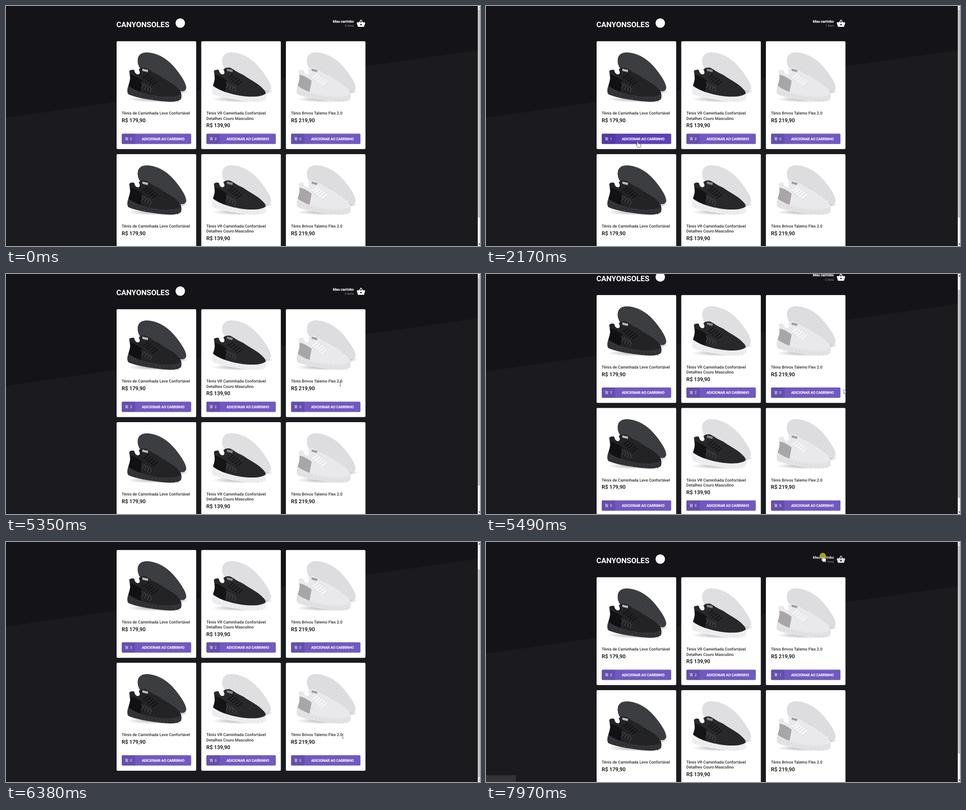
An HTML page that plays this animation: 1050 by 533 pixels, repeating every 8000 ms.

```html
<!DOCTYPE html>
<html lang="pt-BR">
<head>
<meta charset="utf-8">
<title>Loja</title>
<style>
html, body { margin: 0; width: 100%; height: 100%; overflow: hidden; background: #1b1a1f; }
svg { display: block; width: 100vw; height: 100vh; font-family: Roboto, Arial, sans-serif; text-rendering: geometricPrecision; }
.title { font-size: 8.95px; font-weight: 500; fill: #2b2b2b; }
.price { font-size: 11.75px; font-weight: 500; fill: #000; }
.label { font-size: 7.875px; fill: #fff; }
.bold { font-weight: 500; stroke: #fff; stroke-width: .28; }
.sub { font-size: 6.75px; fill: #999; }
.logo { font-size: 16.7px; font-weight: 700; fill: #fff; }
</style>
</head>
<body>
<svg id="stage" viewBox="0 0 1050 533" preserveAspectRatio="none"></svg>
<script>
const LOOP = 8000, MAX_SCROLL = 61, ROW = 250.7, COL = 187.5;

const products = [
  { lines: ['Tênis de Caminhada Leve Confortável'], price: 'R$ 179,90', width: 151,
    sole: '#434448', ridge: '#292a2d', upper: '#232326', heel: '#111113', mid: '#333438', groove: '#1f2022', lace: '#0d0d0f', strap: '#5a5b60', tag: '#b9b9bb' },
  { lines: ['Tênis VR Caminhada Confortável', 'Detalhes Couro Masculino'], price: 'R$ 139,90', width: 132,
    sole: '#e5e5e7', ridge: '#cfcfd2', upper: '#28282b', heel: '#141416', mid: '#eeeef0', groove: '#dddde0', lace: '#0f0f11', strap: '#5a5b60', tag: '#88888b' },
  { lines: ['Tênis Brivos Talemo Flex 2.0'], price: 'R$ 219,90', width: 117,
    sole: '#e2e2e4', ridge: '#d0d0d3', upper: '#e9e9ec', heel: '#aaa6a7', mid: '#e3e3e6', groove: '#cfcfd3', lace: '#fff', strap: 'none', tag: '#a19fa1', back: '#9b9a9c' }
];

// Cursor path: time, x, y
const path = [
  [200, 1012, 533], [400, 930, 330], [580, 720, 160], [760, 480, 98], [980, 296, 185],
  [1040, 294, 190], [1240, 318, 300], [1380, 340, 322], [1560, 359, 302], [2030, 359, 302],
  [2170, 336, 301], [2910, 336, 301], [3060, 346, 301], [3700, 346, 301], [3740, 350, 301],
  [3860, 430, 298], [4040, 533, 297], [4880, 533, 297], [5100, 620, 275], [5350, 740, 244],
  [5470, 790, 255], [5590, 803, 263], [5900, 800, 330], [6300, 752, 430], [6540, 735, 435],
  [6720, 735, 380], [7050, 725, 298], [7320, 725, 298], [7520, 795, 190], [7760, 772, 85], [7930, 746, 31]
];
const presses = [1740, 2580, 3100, 4220, 4700, 7190, 7950];
// Moments at which each first-row counter goes up by one
const adds = [[2030, 2710, 3280], [4380, 4860], [7350]];

const icons = {
  cart: 'M11 9h2V6h3V4h-3V1h-2v3H8v2h3v3zm-4 9c-1.1 0-1.99.9-1.99 2S5.9 22 7 22s2-.9 2-2-.9-2-2-2zm10 0c-1.1 0-1.99.9-1.99 2s.89 2 1.99 2 2-.9 2-2-.9-2-2-2zm-9.83-3.25l.03-.12.9-1.63h7.45c.75 0 1.41-.41 1.75-1.03l3.86-7.01L19.42 4h-.01l-1.1 2-2.76 5H8.53l-.13-.27L6.16 6l-.95-2-.94-2H1v2h2l3.6 7.59-1.35 2.45c-.16.28-.25.61-.25.96 0 1.1.9 2 2 2h12v-2H7.42c-.13 0-.25-.11-.25-.25z',
  basket: 'M17.21 9l-4.38-6.56c-.19-.28-.51-.42-.83-.42-.32 0-.64.14-.83.43L6.79 9H2c-.55 0-1 .45-1 1 0 .09.01.18.04.27l2.54 9.27c.23.84 1 1.46 1.92 1.46h13c.92 0 1.69-.62 1.93-1.46l2.54-9.27L23 10c0-.55-.45-1-1-1h-4.79zM9 9l3-4.4L15 9H9zm3 8c-1.1 0-2-.9-2-2s.9-2 2-2 2 .9 2 2-.9 2-2 2z'
};

const cursors = {
  arrow: '<path d="M0 0v9.2l2.1-2 1.4 3.3 1.5-.7-1.4-3.2h2.9z" fill="#fff" stroke="#000" stroke-width=".6"/>',
  hand: '<path d="M-1.2 8V1a1.2 1.2 0 0 1 2.4 0v3.6c2 .1 6 .6 6 2.6v2.3c0 1.6-1.2 2.2-1.2 3.7H0c0-1.7-3.3-4-3.5-5.4 .1-1.3 1.5-.8 2.3.2z" fill="#fff" stroke="#111" stroke-width=".7"/>',
  beam: '<path d="M-1.5-4.5h3M0-4.5v9M-1.5 4.5h3" fill="none" stroke="#444" stroke-width=".8"/>'
};

const strokes = (n, f, colour, width) =>
  `<path d="${Array.from({ length: n }, (_, i) => f(i)).join('')}" fill="none" stroke="${colour}" stroke-width="${width}" stroke-linecap="round"/>`;

function shoe(p, i) {
  const rear = 'M292 121C292 107 303 102 318 104C341 107 360 120 376 140C388 155 399 172 399 182C398 189 391 191 383 187C365 176 320 165 300 142C294 135 292 128 292 121Z';
  return `<pattern id="ridge${i}" width="6" height="4.6" patternUnits="userSpaceOnUse" patternTransform="rotate(28)">
      <path d="M0 2.3q1.5-1.6 3 0t3 0" fill="none" stroke="${p.ridge}" stroke-width="1.1"/></pattern>
    <g id="shoe${i}">
      <ellipse cx="330" cy="207" rx="62" ry="7" fill="url(#shadow)"/>
      <ellipse cx="380" cy="190" rx="24" ry="6" fill="url(#shadow)"/>
      ${p.back ? `<path d="M355 125Q368 133 373 149L362 140Z" fill="${p.back}"/>` : ''}
      <path d="${rear}" fill="${p.sole}"/>
      <path d="${rear}" fill="url(#ridge${i})" stroke="${p.ridge}" stroke-width=".6"/>
      <path d="M273 144C277 141 281 141 284 142C285 147 287 151 292 152C298 151 297 146 294 141C297 137 303 136 309 137L318 142C326 148 332 150 338 153C352 163 372 172 384 186C389 192 389 198 386 203C350 209 300 203 271 184C271 176 275 168 275 160Z" fill="${p.upper}"/>
      <path d="M275 153C282 153 290 157 302 166L297 193C287 190 278 184 271 177C273 170 276 164 275 153Z" fill="${p.heel}"/>
      <path d="M302 139l13 3-1 5-12-3z" fill="${p.tag}"/>
      ${strokes(5, k => `M${304 + 5 * k} ${159 + 4 * k}q6-2 ${11} ${-8}`, p.lace, 1.8)}
      ${strokes(4, k => `M${300 + 6 * k} ${169 + 3 * k}l4 7-3 6`, p.strap, 1)}
      <path d="M271 177C268 185 268 192 271 196C285 203 320 209 350 212C370 214 384 212 388 206C389 201 389 197 388 194C380 203 350 203 325 198C305 194 285 188 271 177Z" fill="${p.mid}"/>
      ${strokes(13, k => `M${275 + 8.6 * k} ${190 + 17 * Math.sin(k / 9)}l3 6`, p.groove, .9)}
    </g>`;
}

function card(i) {
  const col = i % 3, p = products[col], extra = (p.lines.length - 1) * 11.25;
  return `<g transform="translate(${col * COL} ${Math.floor(i / 3) * ROW})">
    <rect x="245" y="78.2" width="176.3" height="239.6" rx="2.25" fill="#fff"/>
    <use href="#shoe${col}"/>
    ${p.lines.map((s, k) => `<text class="title" x="256.3" y="${241.3 + 11.25 * k}">${s}</text>`).join('')}
    <text class="price" x="256.3" y="${258.2 + extra}">${p.price}</text>
    <rect class="button" x="256.4" y="283.4" width="153.8" height="23" rx="2.25"/>
    <path d="M286.2 283.4h-27.5q-2.3 0-2.3 2.3v18.4q0 2.3 2.3 2.3h27.5z" opacity=".1"/>
    <path d="${icons.cart}" fill="#fff" transform="translate(263 290.5) scale(.375)"/>
    <text class="label count" x="274.8" y="297.8">0</text>
    <text class="label bold" x="348.2" y="297.8" text-anchor="middle">ADICIONAR AO CARRINHO</text>
  </g>`;
}

const stage = document.getElementById('stage');
stage.innerHTML = `
  <defs>
    <radialGradient id="shadow"><stop offset=".4" stop-color="#ccc"/><stop offset="1" stop-color="#fff"/></radialGradient>
    ${products.map(shoe).join('')}
  </defs>
  <rect width="1050" height="533" fill="#1b1a1f"/>
  <g id="page">
    <path d="M0 0H1050V97.3L0 248Z" fill="#131318"/>
    <text class="logo" x="244.4" y="47">CANYONSOLES</text>
    <circle cx="386" cy="38" r="10.5" fill="#fff"/>
    <g id="basket">
      <text class="label bold" x="770.6" y="36.8" text-anchor="end">Meu carrinho</text>
      <text class="sub" id="items" x="770.6" y="46" text-anchor="end"></text>
      <path d="${icons.basket}" fill="#fff" transform="translate(776.2 28.6) scale(.844)"/>
    </g>
    ${[0, 1, 2, 3, 4, 5].map(card).join('')}
  </g>
  <rect x="1045" width="5" height="533" fill="#f1f1f1"/>
  <rect id="thumb" x="1045.3" width="4.7" height="462" fill="#c1c1c1"/>
  <path id="up" d="M1046 5.5l3.2-3.2 3.2 3.2z"/>
  <path id="down" d="M1046 527.5l3.2 3.2 3.2-3.2z"/>
  <rect id="status" y="518" width="66" height="15" fill="#343438"/>
  <circle id="press" r="7" fill="#e6dc00" fill-opacity=".72"/>
  <g id="cursor"></g>`;

const get = id => document.getElementById(id);
const [page, basket, items, thumb, up, down, status, press, cursor] =
  ['page', 'basket', 'items', 'thumb', 'up', 'down', 'status', 'press', 'cursor'].map(get);
const buttons = [...document.querySelectorAll('.button')];
const counts = [...document.querySelectorAll('.count')];

const clamp = v => Math.min(1, Math.max(0, v));
const easeOut = v => 1 - (1 - clamp(v)) ** 2;
const show = (el, on) => el.setAttribute('visibility', on ? 'visible' : 'hidden');
const move = (el, x, y) => el.setAttribute('transform', `translate(${x} ${y})`);

function cursorAt(t) {
  const k = path.findIndex(p => p[0] > t);
  if (k < 0) return path[path.length - 1].slice(1);
  if (k === 0) return path[0].slice(1);
  const a = path[k - 1], b = path[k], f = (t - a[0]) / (b[0] - a[0]);
  return [a[1] + (b[1] - a[1]) * f, a[2] + (b[2] - a[2]) * f];
}

const scrollAt = t => MAX_SCROLL * (easeOut((t - 5450) / 135) - easeOut((t - 6380) / 260));

let shape;
function draw(t) {
  const scroll = scrollAt(t), [x, y] = cursorAt(t), py = y + scroll;
  move(page, 0, -scroll);
  thumb.setAttribute('y', 8 + scroll * .87);
  up.setAttribute('fill', scroll > .5 ? '#505050' : '#a3a3a3');
  down.setAttribute('fill', scroll > 60.5 ? '#a3a3a3' : '#505050');

  let kind = 'arrow';
  buttons.forEach((b, i) => {
    const dx = x - (i % 3) * COL, dy = py - Math.floor(i / 3) * ROW, p = products[i % 3];
    const over = dx > 256.4 && dx < 410.2 && dy > 283.4 && dy < 306.4;
    b.setAttribute('fill', over ? '#5c40b6' : '#7159c1');
    if (over) kind = 'hand';
    else if (dx > 256 && dx < 256 + p.width && dy > 232.5 && dy < 233.8 + 11.25 * p.lines.length) kind = 'beam';
  });
  const overBasket = x > 724 && x < 796 && py > 28 && py < 48;
  if (overBasket) kind = 'hand';
  basket.setAttribute('opacity', overBasket ? .86 : 1);
  show(status, overBasket);

  const added = adds.map(list => list.filter(s => t >= s).length);
  added.forEach((n, i) => counts[i].textContent = n);
  const total = added.filter(Boolean).length;
  items.textContent = total + (total === 1 ? ' item' : ' itens');

  show(press, presses.some(s => t >= s && t < s + 95));
  move(press, x, y);
  if (kind !== shape) cursor.innerHTML = cursors[shape = kind];
  show(cursor, t >= 200);
  move(cursor, x, y);
}

const start = performance.now();
function tick() {
  draw((performance.now() - start) % LOOP);
  requestAnimationFrame(tick);
}
tick();
</script>
</body>
</html>
```
